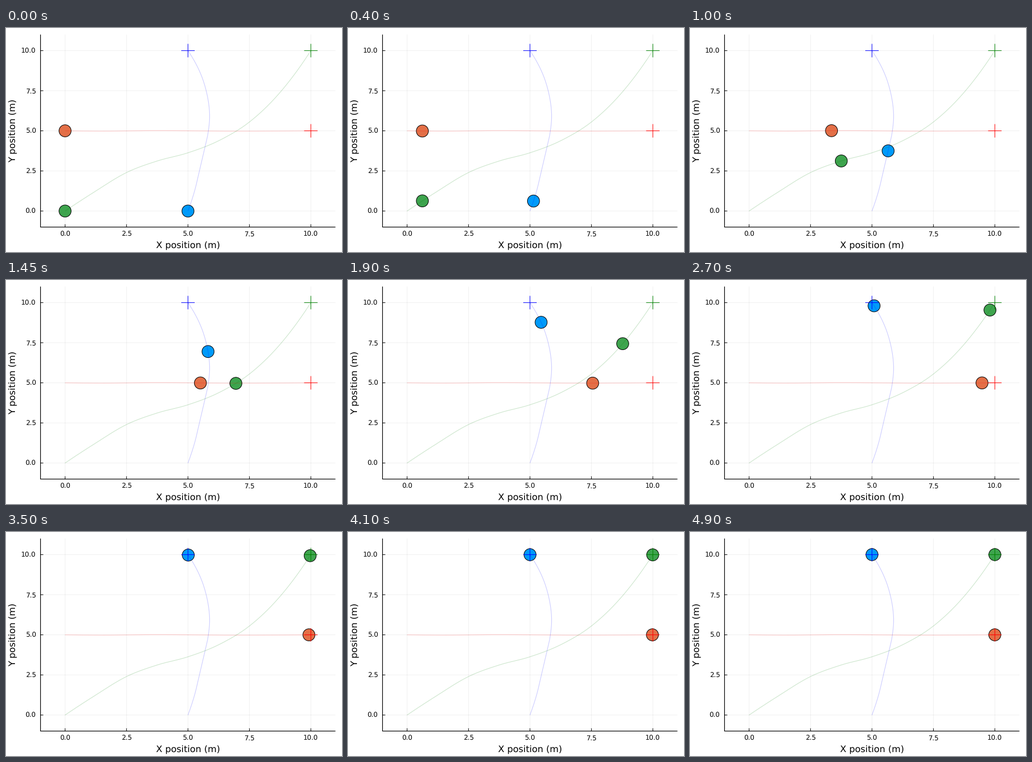
Animation of 600 by 400 pixels, one loop 4.95 s. Source, as a matplotlib script:

```python
import numpy as np
import matplotlib.pyplot as plt
from matplotlib.animation import FuncAnimation
from matplotlib.patches import Circle

W, H, DPI = 600, 400, 100
FRAMES, INTERVAL = 99, 50
PX = 72 / DPI
LEFT, RIGHT, TOP, BOTTOM = 61.6, 588.3, 11.7, 355.5
TICKS = (0, 2.5, 5, 7.5, 10)
LENGTH = 10     # metres from start to goal

# Bends of each path: (distance travelled along its main axis, other axis).
BLUE_BENDS = [(0, 5), (1.2, 5.26), (2.5, 5.465), (3.75, 5.657), (4.8, 5.81),
              (5.85, 5.88), (7.2, 5.785), (8.8, 5.445), (10, 5)]
RED_BENDS = [(0, 5), (1.5, 4.98), (3.6, 5.01), (6.5, 4.98), (10, 5)]
GREEN_BENDS = [(0, 0), (1.2, 1.2), (2.5, 2.4), (3.75, 3.12), (5, 3.63),
               (6.3, 4.42), (7.5, 5.55), (8.75, 7.4), (10, 10)]


def px(x):
    return LEFT + (np.asarray(x) + 1) * (RIGHT - LEFT) / 12


def py(y):
    return BOTTOM - (np.asarray(y) + 1) * (BOTTOM - TOP) / 12


def smooth(points, t):
    """Cubic Hermite curve through a few points."""
    k, v = np.array(points, float).T
    m = np.gradient(v, k, edge_order=2)
    i = np.clip(np.searchsorted(k, t, side="right") - 1, 0, len(k) - 2)
    h = k[i + 1] - k[i]
    u = (t - k[i]) / h
    return ((1 + 2 * u) * (1 - u) ** 2 * v[i] + u * (1 - u) ** 2 * h * m[i]
            + u * u * (3 - 2 * u) * v[i + 1] - u * u * (1 - u) * h * m[i + 1])


def drive(step):
    """Distance travelled: speed up, then settle like a damped spring."""
    switch, power, rate = 19, 1.96, 0.14
    launch = 0.01056 * step ** power
    reached = 0.01056 * switch ** power
    speed = power * reached / switch
    rest = LENGTH - reached
    s = np.maximum(step - switch, 0)
    settle = LENGTH - (rest + (rate * rest - speed) * s) * np.exp(-rate * s)
    return np.where(step < switch, launch, settle)


def give_way(step):
    """Steps lost while letting the other robots pass."""
    p = np.clip((step - 17.5) / 36.5, 0, 1)
    return 8.3 * (1 - (1 - p) ** 2)


def place(bends, upward, distance):
    side = smooth(bends, distance)
    x, y = (side, distance) if upward else (distance, side)
    return px(x), py(y)


plt.rcParams["font.family"] = "DejaVu Sans"
plt.rcParams["path.snap"] = False
plt.rcParams["text.hinting"] = "none"
fig = plt.figure(figsize=(W / DPI, H / DPI), dpi=DPI, facecolor="white")
ax = fig.add_axes([0, 0, 1, 1])
ax.set_xlim(0, W)
ax.set_ylim(H, 0)
ax.axis("off")


def line(x, y, color, width=1, **style):
    ax.plot(x, y, color=color, lw=width * PX, solid_capstyle="butt", **style)


def label(x, y, text, size, ha="center", **style):
    ax.text(x, y, text, fontsize=size * PX, ha=ha, va="baseline", **style)


for tick in TICKS:
    x, y = px(tick), py(tick)
    line([x, x], [TOP, BOTTOM], "black", alpha=0.06, zorder=1)
    line([LEFT, RIGHT], [y, y], "black", alpha=0.06, zorder=1)
    line([x, x], [BOTTOM, BOTTOM - 5], "black", zorder=2)
    line([LEFT, LEFT + 5], [y, y], "black", zorder=2)
    label(x, 371.5, f"{tick:.1f}", 11.85)
    label(53.6, y + 4.4, f"{tick:.1f}", 11.85, ha="right")

line([LEFT, LEFT, RIGHT], [TOP, BOTTOM, BOTTOM], "black", 1.2, zorder=2,
     solid_joinstyle="miter")
label(325.6, 392.3, "X position (m)", 16.3)
label(17, 183.1, "Y position (m)", 16.3, rotation=90, rotation_mode="anchor")

step = np.arange(FRAMES)
clear_run = drive(step)
slow_run = drive(step - give_way(step))
whole = np.linspace(0, LENGTH, 200)

robots = []
for bends, upward, run, fill, stroke in (
        (BLUE_BENDS, True, clear_run, "#009afa", "blue"),
        (RED_BENDS, False, slow_run, "#e36f47", "red"),
        (GREEN_BENDS, False, clear_run, "#3ea44e", "green")):
    xs, ys = place(bends, upward, run)
    disc = Circle((xs[0], ys[0]), 10.8, fc=fill, ec="black", lw=PX, zorder=3)
    ax.add_patch(disc)
    robots.append((disc, xs, ys))

    path_x, path_y = place(bends, upward, whole)
    line(path_x, path_y, stroke, 1.1, alpha=0.2, zorder=4)
    goal_x, goal_y = path_x[-1], path_y[-1]
    line([goal_x - 12, goal_x + 12], [goal_y] * 2, stroke, zorder=5)
    line([goal_x] * 2, [goal_y - 12, goal_y + 12], stroke, zorder=5)


def update(frame):
    for disc, xs, ys in robots:
        disc.center = xs[frame], ys[frame]
    return [disc for disc, _, _ in robots]


anim = FuncAnimation(fig, update, frames=FRAMES, interval=INTERVAL,
                     repeat=True, repeat_delay=0)
plt.show()
```
